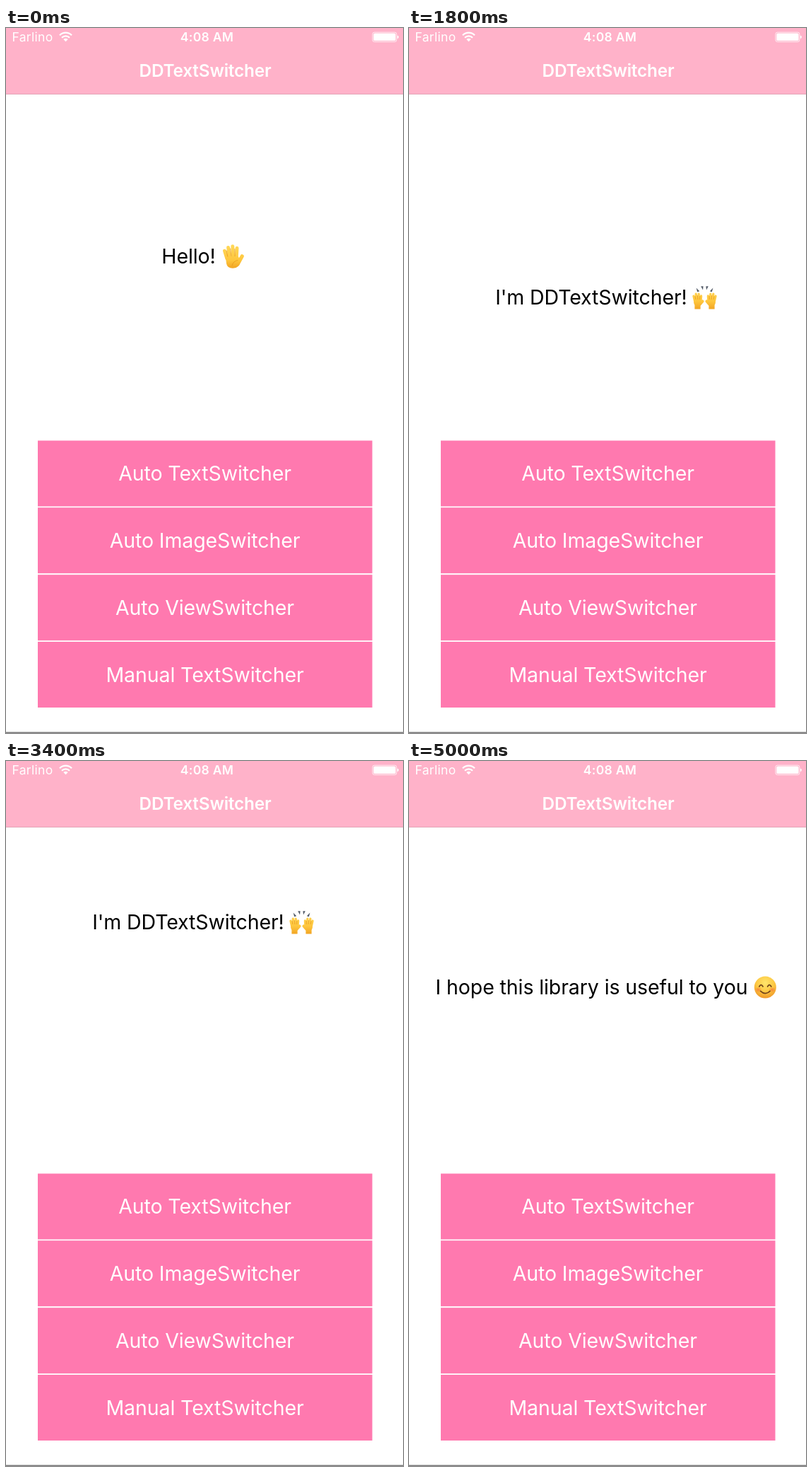
An HTML page that plays this animation: 562 px wide and 997 px high, repeating every 5.1 s.

```html
<!DOCTYPE html>
<html lang="en">
<head>
<meta charset="utf-8">
<title>DDTextSwitcher</title>
<style>
  html, body { margin: 0; width: 100%; height: 100%; overflow: hidden; background: #fff; }
  svg { display: block; width: 562px; height: 997px; }
  text { font-family: Inter, Roboto, "Liberation Sans", sans-serif; }
  .status { font-size: 17.5px; letter-spacing: .3px; fill: #fff; }
  .title { font-size: 24.3px; font-weight: 600; letter-spacing: -.15px; fill: #fff; text-anchor: middle; }
  .button rect { fill: #ff79af; }
  .button text, .label text { font-size: 28.5px; letter-spacing: -.1px; text-anchor: middle; }
  .button text { fill: #fff; }
  .hand { fill: none; stroke: url(#skin); stroke-linecap: round; stroke-linejoin: round; }
  .crease { fill: none; stroke: #e79a1f; stroke-width: .8; stroke-linecap: round; }
</style>
</head>
<body>
<svg viewBox="0 0 562 997">
  <defs>
    <clipPath id="window"><rect y="94" width="562" height="453"/></clipPath>
    <linearGradient id="skin" gradientUnits="userSpaceOnUse" x1="0" y1="303" x2="0" y2="338">
      <stop offset="0" stop-color="#ffd95a"/>
      <stop offset=".65" stop-color="#fec63d"/>
      <stop offset="1" stop-color="#f0a020"/>
    </linearGradient>
    <radialGradient id="face" cx=".5" cy=".3" r=".72">
      <stop offset="0" stop-color="#ffe56c"/>
      <stop offset=".55" stop-color="#fdc944"/>
      <stop offset="1" stop-color="#ee9526"/>
    </radialGradient>
    <radialGradient id="blush">
      <stop offset="0" stop-color="#f47a3a" stop-opacity=".85"/>
      <stop offset="1" stop-color="#f47a3a" stop-opacity="0"/>
    </radialGradient>
    <g id="raised">
      <g class="hand">
        <path stroke-width="3.3" d="M404.6 325L403 318.2M407.4 324L406.2 315.2M410.4 324L410.2 315.2M413 325L413.6 318"/>
        <path stroke-width="4" d="M411.6 330L415.6 325.4"/>
      </g>
      <path fill="url(#skin)" d="M403 323H414.2Q414.4 328 412.6 331V336.4H404.4V331Q402.6 328 403 323Z"/>
      <path class="crease" d="M405.8 322.5L405 318.5M408.9 322.5L408.4 317.5M411.7 322.5L411.9 318.5"/>
    </g>
  </defs>

  <g clip-path="url(#window)">
    <g class="label">
      <text x="258.5" y="330">Hello!</text>
      <g class="hand">
        <path stroke-width="4.9" d="M312.8 323L309.5 312.2M316.6 322L314.6 307.4M321.6 322L320.8 305.6M326.2 322L327 308.2"/>
        <path stroke-width="5.2" d="M328 331L334.2 319.8"/>
      </g>
      <path fill="url(#skin)" d="M310.8 320H328.8L331.6 326Q331 336.8 321 336.8Q313.2 336.8 312 330Z"/>
      <path class="crease" d="M313.7 320L312.2 312M318.8 319.5L317.7 309M324 319.5L323.9 309.5M320 333Q321.5 326.5 328 325.5"/>
    </g>
    <g class="label">
      <text x="258" y="330">I'm DDTextSwitcher!</text>
      <path fill="#535b68" d="M406.6 306.4L411.2 311.2L408.2 312.3ZM413.2 304.2H416.6L416 309.4ZM420.4 304.2H423.8L421 309.4ZM430.4 306.4L428.8 312.3L425.8 311.2Z"/>
      <use href="#raised"/>
      <use href="#raised" transform="translate(837 0) scale(-1 1)"/>
    </g>
    <g class="label">
      <text x="258.5" y="330">I hope this library is useful to you</text>
      <circle cx="504.3" cy="320" r="15.5" fill="url(#face)"/>
      <ellipse cx="494.6" cy="323.4" rx="5" ry="4" fill="url(#blush)"/>
      <ellipse cx="514" cy="323.4" rx="5" ry="4" fill="url(#blush)"/>
      <g fill="none" stroke="#70431a" stroke-width="1.7" stroke-linecap="round">
        <path d="M495.8 319Q498.4 314.2 501 319M507.6 319Q510.2 314.2 512.8 319"/>
        <path d="M497.6 325.4Q504.3 331.8 511 325.4"/>
      </g>
    </g>
  </g>

  <rect width="562" height="93" fill="#ffb2c9"/>
  <rect y="93" width="562" height="1" fill="#e3a4b6"/>
  <text class="status" x="8.5" y="19">Farlino</text>
  <g fill="none" stroke="#fff" stroke-width="2.3">
    <path d="M76 10.2a12 12 0 0 1 17 0M79 13.7a7.8 7.8 0 0 1 11 0"/>
    <path fill="#fff" stroke="none" d="M84.5 19.2l-3.2-3.2a4.5 4.5 0 0 1 6.4 0z"/>
  </g>
  <text class="status" x="284.5" y="19" font-weight="600" text-anchor="middle">4:08 AM</text>
  <rect x="518.9" y="6.1" width="34" height="13.4" rx="2.6" fill="none" stroke="#fff" stroke-opacity=".75"/>
  <rect x="520.3" y="7.5" width="31.2" height="10.6" rx="1.5" fill="#fff"/>
  <path fill="#fff" d="M554 10.4q1.8 .5 1.8 2.4t-1.8 2.4z"/>
  <text class="title" x="282" y="69">DDTextSwitcher</text>

  <g class="button"><rect x="45" y="583.5" width="473.5" height="93"/><text x="281.5" y="640">Auto TextSwitcher</text></g>
  <g class="button"><rect x="45" y="678.2" width="473.5" height="93"/><text x="281.5" y="735">Auto ImageSwitcher</text></g>
  <g class="button"><rect x="45" y="773.2" width="473.5" height="93"/><text x="281.5" y="830">Auto ViewSwitcher</text></g>
  <g class="button"><rect x="45" y="868" width="473.5" height="93"/><text x="281.5" y="924.5">Manual TextSwitcher</text></g>

  <rect y="995" width="562" height="1" fill="#c4c4c4"/>
  <rect y="996" width="562" height="1" fill="#7c7a7c"/>
</svg>
<script>
  const LOOP = 5100, TICK = 100, SLIDE = 1000, HEIGHT = 453;
  const entries = [-945, 1055, 3088];
  const labels = document.querySelectorAll('.label');
  const origin = performance.now();

  // cubic-bezier(.42, 0, .58, 1), solved by bisection
  function easeInOut(x) {
    if (x <= 0) return 0;
    if (x >= 1) return 1;
    let low = 0, high = 1, s;
    for (let i = 0; i < 24; i++) {
      s = (low + high) / 2;
      const r = 1 - s;
      if (1.26 * r * r * s + 1.74 * r * s * s + s * s * s < x) low = s;
      else high = s;
    }
    return s * s * (3 - 2 * s);
  }

  const progress = (time, start) => easeInOut((time - start) / SLIDE);

  function draw() {
    const elapsed = (performance.now() - origin) % LOOP;
    const time = Math.floor(elapsed / TICK) * TICK;
    labels.forEach((label, i) => {
      const entered = progress(time, entries[i]);
      const left = i + 1 < entries.length ? progress(time, entries[i + 1]) : 0;
      const y = Math.round((1 - entered - left) * HEIGHT);
      label.setAttribute('transform', `translate(0 ${y})`);
    });
    requestAnimationFrame(draw);
  }
  draw();
</script>
</body>
</html>
```
